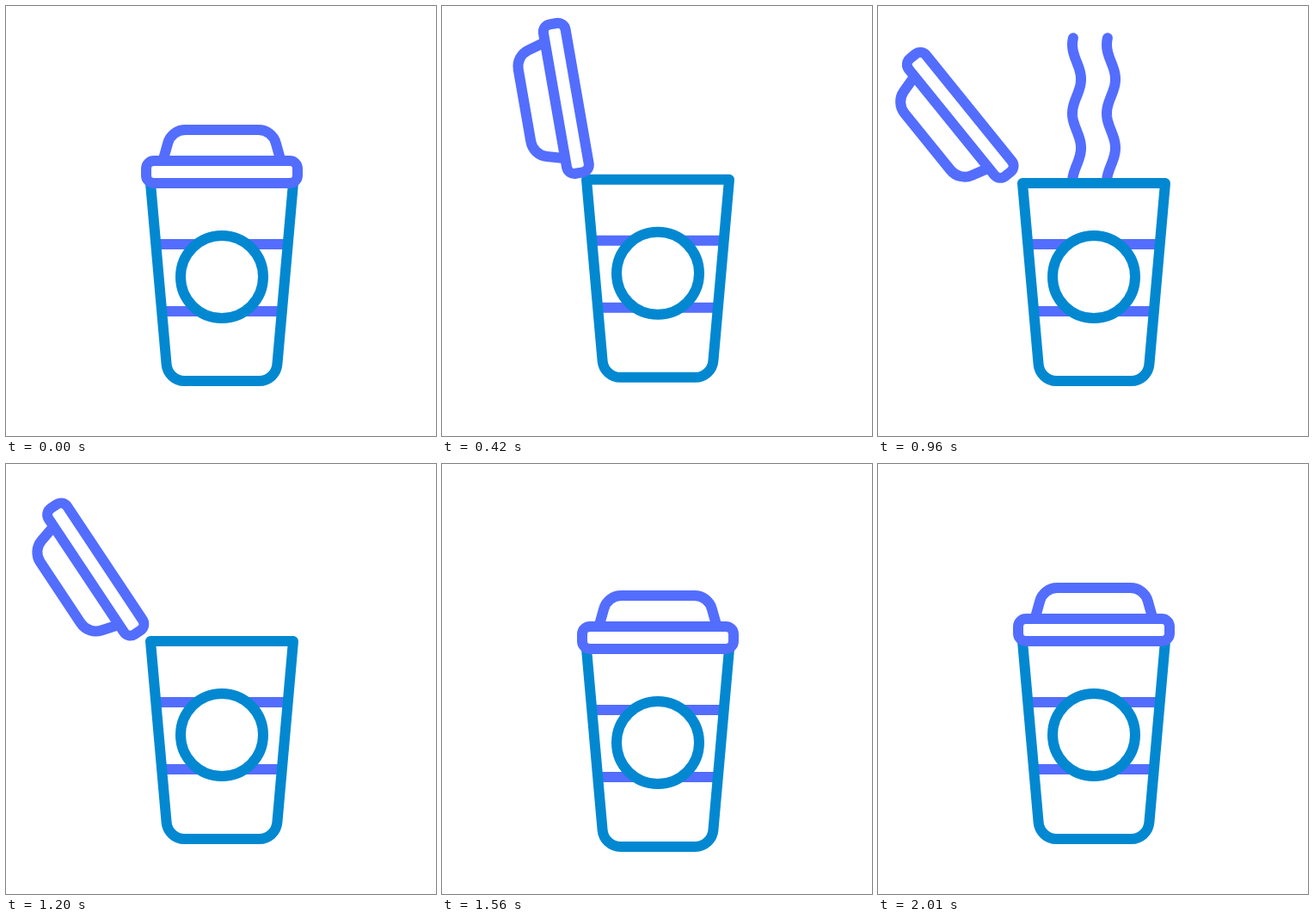
These frames come from a looping animation (500 by 500 pixels, 2.19 s). An HTML page with a canvas:

```html
<!DOCTYPE html>
<html lang="en">
<head>
<meta charset="utf-8">
<title>Coffee cup</title>
<style>
  html, body { margin: 0; width: 100%; height: 100%; overflow: hidden; background: #fff; }
  canvas { display: block; width: 500px; height: 500px; }
</style>
</head>
<body>
<canvas id="stage" width="500" height="500"></canvas>
<script>
const ctx = document.getElementById('stage').getContext('2d');
const BLUE = '#0288d1', VIOLET = '#536dfe';
const LOOP = 2190, STEP = 30;
const OPEN_ANGLE = 129 * Math.PI / 180;
const HINGE = { x: 170, y: 196 };

// Vertical offset of the cup: [time, y]
const BOUNCE = [[0, 0], [120, 10], [270, -10], [540, 0], [1440, 0], [1590, 10], [1770, -7.2], [2010, 0]];

const clamp = v => Math.min(1, Math.max(0, v));
const span = (t, from, to) => clamp((t - from) / (to - from));
const smooth = u => u * u * (3 - 2 * u);

function bounce(t) {
  for (let i = 1; i < BOUNCE.length; i++) {
    const [t0, y0] = BOUNCE[i - 1], [t1, y1] = BOUNCE[i];
    if (t <= t1) return y0 + (y1 - y0) * smooth(span(t, t0, t1));
  }
  return 0;
}

function stroke(color, build) {
  ctx.strokeStyle = color;
  ctx.beginPath();
  build();
  ctx.stroke();
}

function drawSteam(t) {
  const head = -20 + 226 * (1 - (1 - span(t, 540, 870)) ** 2);
  const tail = -20 + 226 * span(t, 840, 1140) ** 1.5;
  if (t <= 540 || tail >= head) return;
  const top = t <= 840 ? -40 : tail;
  ctx.lineCap = 'round';
  for (const x of [231, 271]) {
    stroke(VIOLET, () => {
      const n = 80;
      for (let i = 0; i <= n; i++) {
        const y = top + (head - top) * i / n;
        ctx.lineTo(x + 5 * Math.cos((y - 85) * Math.PI / 40), y);
      }
    });
  }
  ctx.lineCap = 'butt';
}

function drawCup() {
  stroke(VIOLET, () => {
    ctx.moveTo(175, 277); ctx.lineTo(327, 277);
    ctx.moveTo(182, 355); ctx.lineTo(320, 355);
  });
  stroke(BLUE, () => {
    ctx.moveTo(168, 206);
    ctx.arcTo(188.3, 436, 251, 436, 21);
    ctx.arcTo(313.7, 436, 334, 206, 21);
    ctx.lineTo(334, 206);
    ctx.closePath();
  });
  ctx.fillStyle = '#fff';
  stroke(BLUE, () => {
    ctx.arc(251, 315, 48, 0, 2 * Math.PI);
    ctx.fill();
  });
}

function drawLid(p) {
  // The hinge slides over the rim as the lid swings
  const dx = p * (21.5 - 42.5 * p);
  const dy = p * (27 + p * (-72.6 + 37.6 * p));
  ctx.save();
  ctx.translate(HINGE.x + dx, HINGE.y + dy);
  ctx.rotate(-OPEN_ANGLE * p);
  ctx.translate(-HINGE.x, -HINGE.y);
  stroke(VIOLET, () => {
    ctx.moveTo(183, 178);
    ctx.arcTo(192.5, 144, 251, 144, 21);
    ctx.arcTo(309.5, 144, 319, 178, 21);
    ctx.lineTo(319, 178);
  });
  stroke(VIOLET, () => ctx.roundRect(163, 180, 176, 26, 9));
  ctx.restore();
}

function draw(t) {
  ctx.fillStyle = '#fff';
  ctx.fillRect(0, 0, 500, 500);
  ctx.lineWidth = 12;
  ctx.lineJoin = 'round';
  drawSteam(t);
  ctx.save();
  ctx.translate(0, bounce(t));
  drawCup();
  drawLid(smooth(span(t, 150, 540)) - smooth(span(t, 1152, 1542)));
  ctx.restore();
}

const start = performance.now();
function tick() {
  const t = (performance.now() - start) % LOOP;
  draw(Math.floor(t / STEP) * STEP);
  requestAnimationFrame(tick);
}
tick();
</script>
</body>
</html>
```
